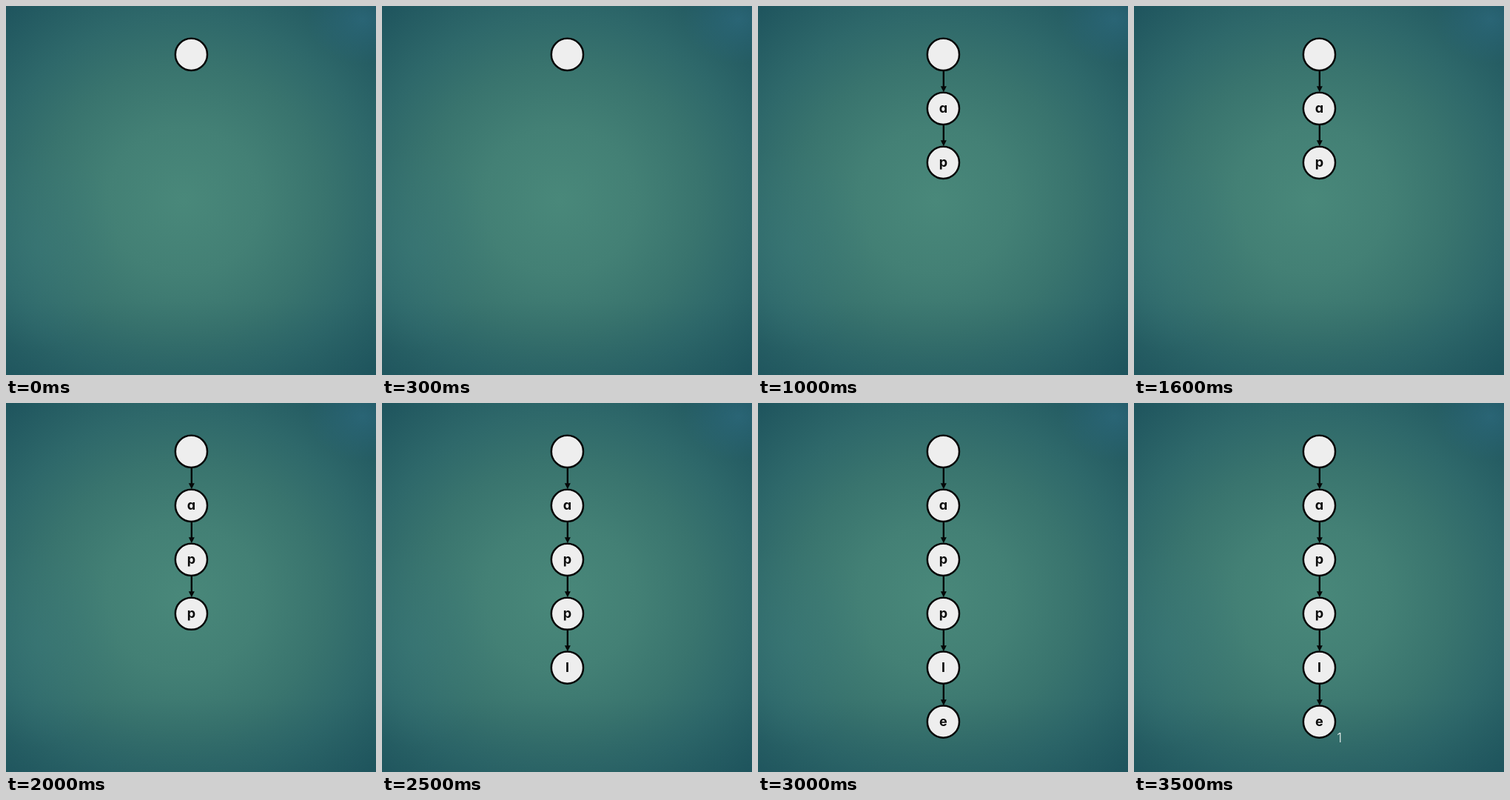
Write an HTML page that moves like this. It is 500x498 px and loops after 4 s.

```html
<!DOCTYPE html>
<html lang="en">
<head>
<meta charset="utf-8">
<title>Trie insertion</title>
<style>
  html, body { margin: 0; width: 100%; height: 100%; overflow: hidden; }
  body {
    background:
      radial-gradient(75px 60px at 482px 18px, #2c687ad0, #2c687a00),
      radial-gradient(110px 140px at 45px 325px, #3a797a70, #3a797a00),
      linear-gradient(#1b505900 80%, #1b505948),
      radial-gradient(385px 370px at 240px 262px,
        #49887a, #438075 27%, #39746e 49%, #2e686a 68%, #1b505b);
  }
  svg { display: block; width: 100%; height: 100%; }
  text { font-family: Inter, "Noto Sans", sans-serif; text-anchor: middle; }
  .letter { font-size: 18px; font-weight: 700; fill: #0b0b0b; }
  .count { font-size: 17px; font-weight: 300; fill: #eef4f2; }
</style>
</head>
<body>
<svg id="stage" viewBox="0 0 500 498"></svg>
<script>
const LOOP = 4000, X = 250.4, TOP = 65.4, STEP = 72.95;
// The Latin alpha gives the single-storey letter shape.
const nodes = [["", 0], ["ɑ", 500], ["p", 1000], ["p", 2000], ["l", 2500], ["e", 3000]];
const stage = document.getElementById("stage");

const arrow = y => `
  <path d="M${X + .4} ${y - 51}V${y - 28}" stroke="#050808" stroke-width="2.4"/>
  <path d="M${X - 3.6} ${y - 30}h8l-4 8z" fill="#050808"/>`;

const node = (letter, y) => `
  <circle cx="${X}" cy="${y}" r="21.6" fill="#eee" stroke="#050505" stroke-width="2.5"/>
  <text class="letter" x="${X}" y="${y + 6}">${letter}</text>`;

const parts = nodes.map(([letter, start], i) => {
  const y = TOP + i * STEP;
  return [(i ? arrow(y) : "") + node(letter, y), start];
});
parts.push(['<text class="count" x="277.7" y="457.5">1</text>', 3500]);

stage.innerHTML = parts.map(([markup]) => `<g>${markup}</g>`).join("");
const groups = [...stage.children];

const origin = performance.now();
function draw(now) {
  const t = Math.max(0, now - origin) % LOOP;
  groups.forEach((g, i) => g.setAttribute("visibility", t >= parts[i][1] ? "visible" : "hidden"));
  requestAnimationFrame(draw);
}
draw(origin);
</script>
</body>
</html>
```
